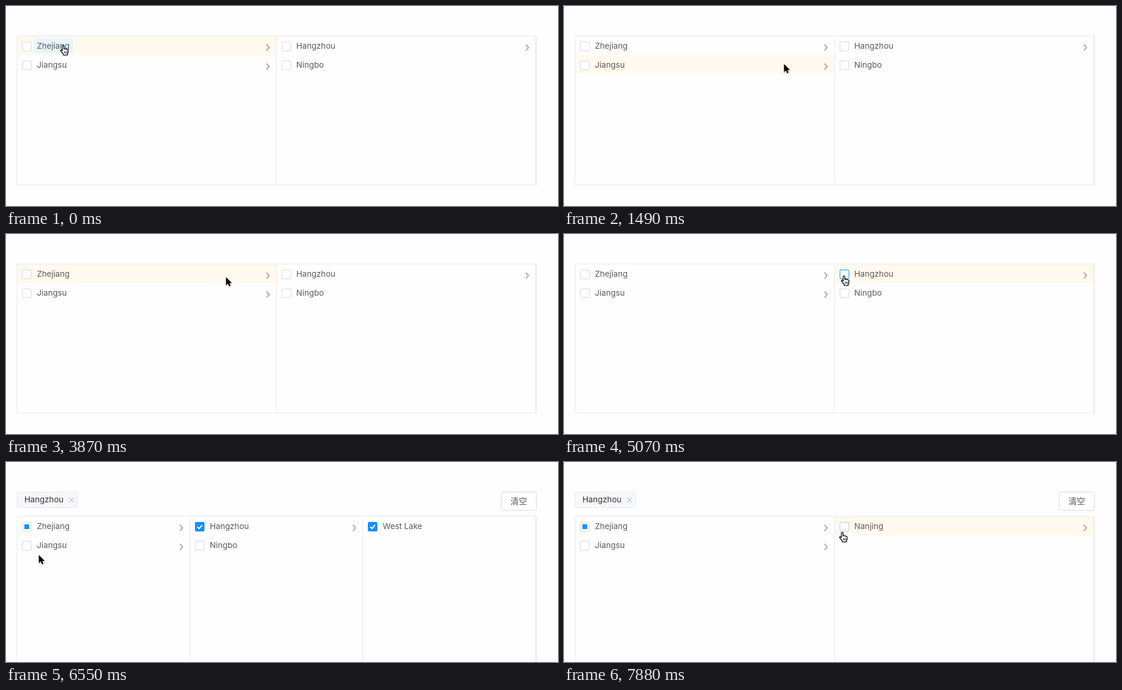
These frames come from a looping animation (929x337 px, 8000 ms). An HTML page:

```html
<!DOCTYPE html>
<html lang="en">
<head>
<meta charset="utf-8">
<title>Cascading checkbox columns</title>
<style>
html, body { margin: 0; width: 100%; height: 100%; overflow: hidden; background: #fefefe; }
svg { display: block; }
text { font: 13.6px Inter, "Noto Sans CJK SC", "Noto Sans CJK", sans-serif; fill: #595959; }
</style>
</head>
<body>
<svg id="stage" width="929" height="337" viewBox="0 0 929 337">
  <defs>
    <filter id="shade" x="-40%" y="-40%" width="180%" height="190%">
      <feDropShadow dx="0" dy="1" stdDeviation=".8" flood-opacity=".35"/>
    </filter>
    <path id="arrow" d="M.3 .8V14.6L3.5 11.6L5.6 16.3L8 15.3L6 10.7H10.2Z" fill="#000" stroke="#fff"
      stroke-width="1" paint-order="stroke"/>
    <g id="hand" transform="translate(-5 0)" stroke="#000" stroke-width="1.2" stroke-linejoin="round">
      <path fill="#fff" d="M4 9.5V2a1.3 1.3 0 0 1 2.6 0V6.5q1.4-1 2.6.2q1.4-.7 2.4.6q1.7-.3 1.9 1.3V10.6
        Q13.3 13 12.2 14.4V16.5H5.8V15.2C4.2 13.5 2.5 11 1.1 9.6Q.4 8.2 1.8 7.9Q3 7.9 4 9.5Z"/>
      <path fill="none" stroke-width=".9" d="M7.3 10.5v3.2M9.2 10.5v3.2M11.1 10.5v3.2"/>
    </g>
  </defs>
  <g id="panel"></g>
  <use id="cursor" filter="url(#shade)"/>
</svg>
<script>
const LOOP = 8000, STEP = 146, ROW = 32, BLUE = '#1890ff', LINE = '#e9e9e9';
const provinces = ['Zhejiang', 'Jiangsu'], zhejiang = ['Hangzhou', 'Ningbo'], jiangsu = ['Nanjing'];
const leaves = ['Ningbo', 'West Lake'];
const marks = { Zhejiang: 'part', Hangzhou: 'full', 'West Lake': 'full' };
const views = [
  { start: 0, columns: [provinces, zhejiang] },
  { start: 2670, columns: [provinces, jiangsu] },
  { start: 3870, columns: [provinces, zhejiang] },
  { start: 5370, columns: [provinces, zhejiang, ['West Lake']], picked: true },
  { start: 7140, columns: [provinces, jiangsu], picked: true },
];
// Each mouse stroke bends through `via` and advances once per STEP
const strokes = [
  { start: 0, steps: 1, via: [96, 66], to: [96, 66] },
  { start: 150, steps: 1, via: [140, 66], to: [180, 66] },
  { start: 900, steps: 5, via: [620, 110], to: [370, 97] },
  { start: 1640, steps: 3, via: [345, 140], to: [345, 122] },
  { start: 2380, steps: 1, via: [346, 114], to: [347, 107] },
  { start: 3120, steps: 2, via: [360, 88], to: [370, 72] },
  { start: 4170, steps: 7, via: [500, 95], to: [471, 70] },
  { start: 5960, steps: 5, via: [250, 120], to: [55, 156] },
  { start: 6700, steps: 3, via: [20, 170], to: [75, 139] },
  { start: 7440, steps: 4, via: [290, 228], to: [468, 118] },
];

const panel = document.getElementById('panel');
const cursor = document.getElementById('cursor');
const currentIndex = (list, t) => Math.max(0, list.filter(item => item.start <= t).length - 1);
const rect = (x, y, w, h, fill, stroke = 'none', r = 0) =>
  `<rect x="${x}" y="${y}" width="${w}" height="${h}" rx="${r}" fill="${fill}" stroke="${stroke}"/>`;
const label = (x, y, words, extra = '') => `<text x="${x}" y="${y}" ${extra}>${words}</text>`;
const line = (d, color, width) =>
  `<path d="${d}" fill="none" stroke="${color}" stroke-width="${width}"/>`;

function pointerAt(t) {
  const i = currentIndex(strokes, t), { start, steps, via, to } = strokes[i];
  const from = strokes[Math.max(0, i - 1)].to;
  const done = Math.floor(Math.max(0, t - start) / STEP) + 1;
  const k = Math.min(1, done / steps), rest = 1 - k;
  return to.map((end, axis) =>
    Math.round(rest * rest * from[axis] + 2 * rest * k * via[axis] + k * k * end));
}

function layout({ columns, picked }) {
  const top = picked ? 91 : 50, width = 873 / columns.length;
  return columns.flatMap((names, col) => names.map((name, row) => (
    { name, x: 19 + col * width, end: 19 + (col + 1) * width, y: top + 1 + row * ROW })));
}

function hit({ x, y, end, name }, [px, py]) {
  const within = (left, top, right, bottom) => px >= left && px < right && py >= top && py < bottom;
  return {
    row: within(x, y, end, y + ROW),
    box: within(x + 8, y + 9, x + 25, y + 27),
    title: within(x + 28, y + 4, x + 28 + name.length * 8.2, y + 28),
  };
}

function checkbox(x, y, mark, border) {
  if (mark === 'full') {
    return rect(x, y, 16, 16, BLUE, 'none', 2) +
      line(`M${x + 3.9} ${y + 8.1}l3 3l5.3-6`, '#fff', 2);
  }
  return rect(x + .5, y + .5, 15, 15, '#fff', border, 1.5) +
    (mark === 'part' ? rect(x + 4, y + 4, 8, 8, BLUE) : '');
}

function drawCell(cell, picked, now, before) {
  const { x, y, end, name } = cell, over = hit(cell, now), left = Math.round(x);
  // The border is still pale on the first step of a hover
  const border = !over.box ? '#d9d9d9' : hit(cell, before).box ? BLUE : '#a8cff3';
  return (over.row ? rect(left, y, end - left, ROW - .5, '#fff9ee') : '') +
    (over.title ? rect(x + 28, y + 4, name.length * 8.2, 24, '#e6f5fe', 'none', 2) : '') +
    checkbox(left + 8, y + 9, picked && marks[name], border) +
    label(x + 33, y + 21, name) +
    (leaves.includes(name) ? '' : line(`M${end - 17.2} ${y + 13.8}l4.6 5.2l-4.6 5.2`, '#a6a6a6', 1.8));
}

function drawSelection() {
  return rect(18.5, 50.5, 102, 26, '#f5f7fa', '#e8eaec') +
    label(31, 68, 'Hangzhou', 'style="fill:#333"') +
    line('M106.5 60l7.5 7.5m0-7.5l-7.5 7.5', '#a5a5a5', 1) +
    rect(833.5, 50.5, 59, 31, '#fff', '#d9d9d9', 3) +
    label(863, 71, '清空', 'text-anchor="middle" style="font-size:14px"');
}

function draw(view, now, before) {
  const cells = layout(view), top = view.picked ? 91 : 50;
  const ends = [...new Set(cells.map(cell => Math.round(cell.end)))];
  panel.innerHTML = (view.picked ? drawSelection() : '') +
    rect(18.5, top + .5, 874, 251, 'none', LINE) +
    cells.map(cell => drawCell(cell, view.picked, now, before)).join('') +
    ends.map(end => rect(end - 1, top + 1, 1, 250, LINE)).join('');
  const hits = cells.map(cell => hit(cell, now));
  cursor.setAttribute('href', hits.some(over => over.box || over.title) ? '#hand' : '#arrow');
  cursor.setAttribute('x', now[0]);
  cursor.setAttribute('y', now[1]);
}

let shown = '';
function tick() {
  const t = performance.now() % LOOP;
  const index = currentIndex(views, t);
  const now = pointerAt(t), before = pointerAt(Math.max(0, t - STEP));
  const key = [index, now, before].join();
  if (key !== shown) draw(views[index], now, before);
  shown = key;
  requestAnimationFrame(tick);
}
tick();
</script>
</body>
</html>
```
